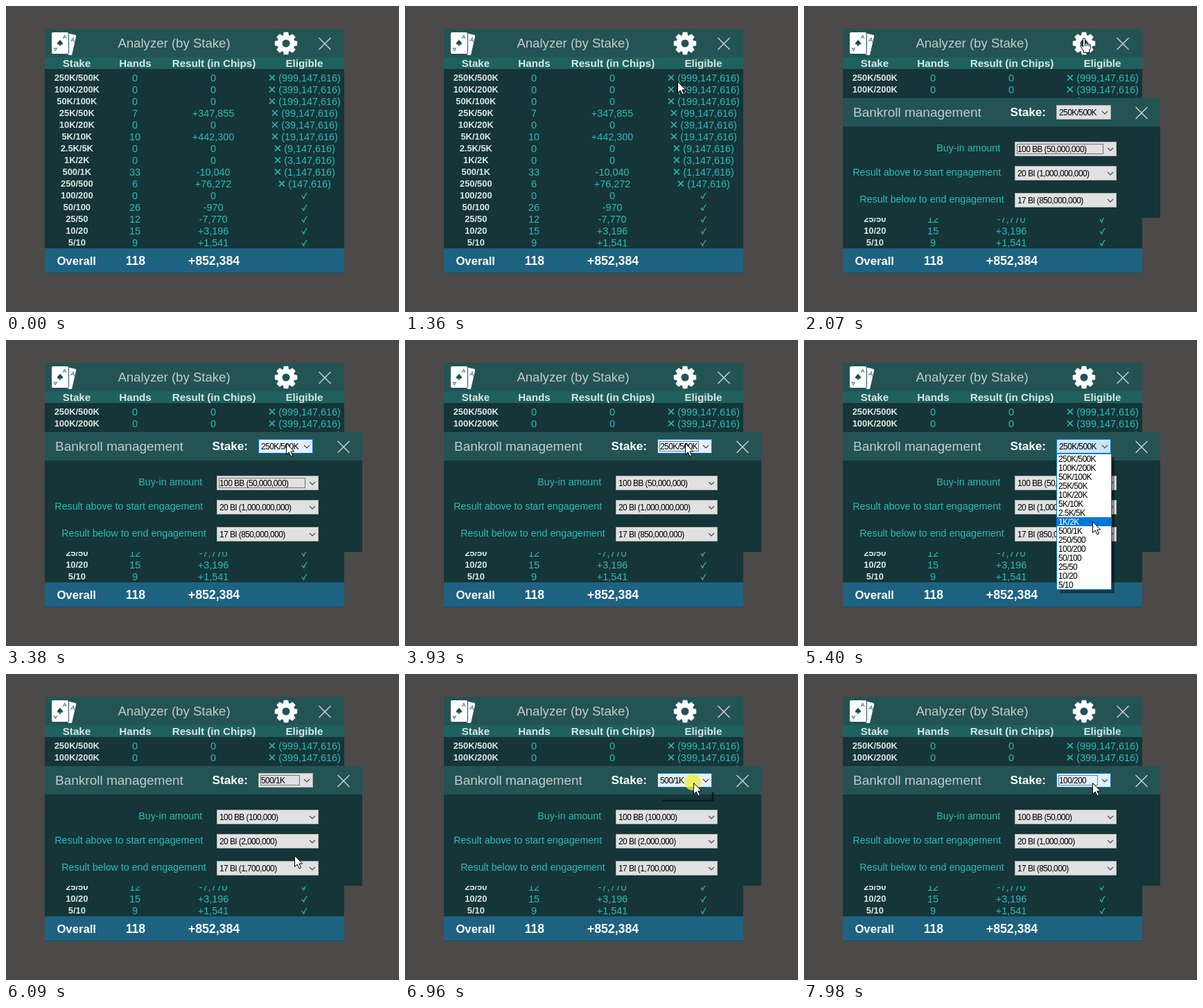
An HTML page that plays this animation: 567x442 px, repeating every 8000 ms.

```html
<!DOCTYPE html>
<html lang="en">
<head>
<meta charset="utf-8">
<title>Analyzer (by Stake)</title>
<style>
html, body { margin: 0; width: 100%; height: 100%; overflow: hidden; background: #4c4a48; }
svg { display: block; width: 567px; height: 442px; font-family: "Liberation Sans", Arial, sans-serif; }
.teal { fill: #2cbcbb; }
.pale { fill: #c3cbcb; }
.bold { font-weight: bold; fill: #fff; }
.head { font-weight: bold; fill: #dbe6e5; }
.mid { text-anchor: middle; }
.small { font-size: 12px; letter-spacing: -.6px; fill: #000; }
</style>
</head>
<body>
<svg id="stage" viewBox="0 0 567 442"></svg>
<script>
const stage = document.getElementById('stage');
const LOOP = 8000;
const STAKES = ['250K/500K', '100K/200K', '50K/100K', '25K/50K', '10K/20K', '5K/10K', '2.5K/5K',
  '1K/2K', '500/1K', '250/500', '100/200', '50/100', '25/50', '10/20', '5/10'];
const HANDS = [0, 0, 0, 7, 0, 10, 0, 0, 33, 6, 0, 26, 12, 15, 9];
const RESULTS = ['0', '0', '0', '+347,855', '0', '+442,300', '0', '0', '-10,040', '+76,272',
  '0', '-970', '-7,770', '+3,196', '+1,541'];
const MISSING = ['999', '399', '199', '99', '39', '19', '9', '3', '1'].map(n => `(${n},147,616)`)
  .concat('(147,616)');

function add(parent, tag, attrs, content) {
  const el = document.createElementNS('http://www.w3.org/2000/svg', tag);
  for (const k in attrs) el.setAttribute(k, attrs[k]);
  if (content !== undefined) el.textContent = content;
  parent.appendChild(el);
  return el;
}
const group = (parent = stage) => add(parent, 'g', {});
const rect = (p, x, y, width, height, fill, more) =>
  add(p, 'rect', { x, y, width, height, fill, ...more });
const path = (p, d, more) => add(p, 'path', { d, fill: 'none', ...more });
const text = (p, s, x, y, size, cls) =>
  add(p, 'text', { x, y, class: cls, ...(size && { 'font-size': size }) }, s);
const show = (el, on) => el.setAttribute('visibility', on ? 'visible' : 'hidden');
const cross = (p, x, y, r, stroke, width) =>
  path(p, `M${x - r} ${y - r}l${2 * r} ${2 * r}m0 ${-2 * r}l${-2 * r} ${2 * r}`,
    { stroke, 'stroke-width': width });

function drawCards(p) {
  const card = { rx: 2.5, stroke: '#245354', 'stroke-width': 1 };
  const back = add(p, 'g', { transform: 'rotate(13 84 54)' });
  rect(back, 75, 38, 24, 31, '#fff', card);
  text(back, 'A', 92, 49, 9, '').setAttribute('fill', '#245354');
  rect(p, 65.5, 37.5, 25, 32, '#fff', card);
  const ink = add(p, 'g', { fill: '#1c4d50', 'font-size': 8 });
  add(ink, 'text', { x: 82, y: 46.5 }, 'A');
  add(ink, 'text', { x: 0, y: 0, transform: 'translate(74 59.5) rotate(180)' }, 'A');
  add(ink, 'path', { d: 'M78 48.5C79 51 82 52 82 54.2C82 56 79.6 56.4 78.5 55L79.6 57.5H76.4L77.5 55C76.4 56.4 74 56 74 54.2C74 52 77 51 78 48.5Z' });
}

function drawGear(p, cx, cy) {
  const g = add(p, 'g', { transform: `translate(${cx} ${cy})`, fill: '#fff' });
  for (let a = 0; a < 360; a += 45)
    add(g, 'path', { d: 'M-4.4 -10L-3.2 -16.2H3.2L4.4 -10Z', transform: `rotate(${a})` });
  add(g, 'circle', { r: 9, fill: 'none', stroke: '#fff', 'stroke-width': 7 });
}

function drawAnalyzer() {
  const g = group();
  rect(g, 56, 33, 432, 353, '#153538');
  rect(g, 56, 33, 432, 41, '#245354');
  rect(g, 56, 74, 432, 17, '#1e615e');
  rect(g, 56, 350, 432, 35.5, '#1e6282');
  drawCards(g);
  text(g, 'Analyzer (by Stake)', 242.5, 60, 18.6, 'pale mid');
  drawGear(g, 404, 54);
  cross(g, 460, 54.5, 8.5, '#cbd3d3', 1.5);
  [['Stake', 102], ['Hands', 186.5], ['Result (in Chips)', 300], ['Eligible', 430.5]]
    .forEach(([s, x]) => text(g, s, x, 88, 15.2, 'head mid'));
  STAKES.forEach((stake, i) => {
    const y = 109 + 17 * i;
    text(g, stake, 102.3, y - 1, 12.9, 'head mid');
    text(g, HANDS[i], 186, y, 14.5, 'teal mid');
    text(g, RESULTS[i], 299, y, 14.4, 'teal mid');
    if (i < MISSING.length) {
      const label = text(g, MISSING[i], 438, y, 14.4, 'teal mid');
      cross(g, 438 - label.getComputedTextLength() / 2 - 9.3, y - 5.5, 4, '#2cbcbb', 1.7);
    } else {
      path(g, `M427 ${y - 4.5}l2.6 3.6q1.6 -5 4.6 -8.2`, { stroke: '#2cbcbb', 'stroke-width': 1.3 });
    }
  });
  text(g, 'Overall', 101.7, 374, 16.7, 'bold mid');
  text(g, '118', 186.8, 374, 17.5, 'bold mid');
  text(g, '+852,384', 300, 374, 17.7, 'bold mid');
}

function makeCombo(p, x, y, w) {
  const face = rect(p, x + .5, y + .5, w - 1, 20, '#e1e1e1', { stroke: '#adadad' });
  const label = text(p, '', x + 4, y + 15, 0, 'small');
  const focus = rect(p, x + 3.5, y + 3.5, w - 23, 14, 'none',
    { stroke: '#000', 'stroke-dasharray': '1 1' });
  path(p, `M${x + w - 13} ${y + 9}l4 4l4 -4`, { stroke: '#444', 'stroke-width': 1.1 });
  return { face, label, focus };
}

const amounts = [];
let stakeBox;
function drawDialog() {
  const g = group();
  rect(g, 56, 133, 458, 173, '#153538');
  rect(g, 56, 133, 458, 41, '#245354');
  text(g, 'Bankroll management', 71, 160, 19, 'pale');
  text(g, 'Stake:', 297.5, 159, 17.2, 'bold');
  cross(g, 487, 154.5, 8.5, '#cbd3d3', 1.5);
  [['Buy-in amount', 191.3, 196], ['Result above to start engagement', 70.3, 231],
    ['Result below to end engagement', 80.3, 270]].forEach(([s, x, y]) => {
    text(g, s, x, y + 14, 14.25, 'teal');
    amounts.push(makeCombo(g, 304, y, 147));
  });
  stakeBox = makeCombo(g, 364, 143, 79);
  return g;
}

drawAnalyzer();
const dialog = drawDialog();

// Drop-down list, unrolled by a growing clip
const shadow = rect(stage, 369, 169, 79, 197, '#000', { opacity: .4 });
const edge = path(stage, 'M372 183H444V171', { stroke: '#081b1e', 'stroke-width': 2.5 });
const clip = rect(add(add(stage, 'defs', {}), 'clipPath', { id: 'unroll' }), 364, 164, 80, 0, '#fff');
const list = add(stage, 'g', { 'clip-path': 'url(#unroll)' });
rect(list, 364.5, 164.5, 79, 196, '#fff', { stroke: '#0078d7' });
const hover = rect(list, 365, 165, 78, 13, '#0078d7');
const items = STAKES.map((s, i) => text(list, s, 367, 176 + 13 * i, 0, 'small'));

const halo = add(stage, 'circle', { r: 12, fill: '#f0ee38', opacity: .78 });
const pen = { fill: '#fff', stroke: '#000', 'stroke-width': 1, 'stroke-linejoin': 'round' };
const arrow = path(stage, 'M.5 .5V16.5L4.2 13L7 19L9.6 17.9L6.8 12H11.8Z', pen);
const hand = group();
path(hand, 'M-.5 1.5Q-.5 .5 1 .5T2.5 2V8Q4.3 6.8 5.3 8.4Q7 7.6 8 9.2Q10 8.8 10.2 11V15.5L8.5 18V21.5H.5V19L-4 12.5Q-4.6 10.8 -3 10.7L-.5 13Z', pen);
path(hand, 'M2.5 8V12M5.3 8.6V12M8 9.4V12.3', { stroke: '#000' });

// Cursor moves: start, last step, number of steps, from x y, to x y
const MOVES = [
  [660, 810, 3, 452, 437, 379, 193],
  [1120, 1580, 7, 379, 193, 403, 46],
  [3000, 3380, 6, 403, 46, 404, 149],
  [4940, 5400, 7, 404, 149, 416, 262],
  [5480, 5480, 1, 416, 262, 416, 277],
  [6020, 6570, 8, 416, 277, 416, 157]
];
const CLICKS = [[1900, 2070], [3460, 3770], [4470, 4710], [5630, 5860], [6740, 6800], [6960, 7200]];
// Time and visible height of the list
const UNROLL = [[0, 0], [3540, 90], [3610, 197], [3690, 0], [4550, 110], [4630, 197], [5860, 0],
  [7040, 189], [7120, 0]];
const STAKE_AT = [[0, 0], [5860, 8], [7280, 9], [7980, 10]];
const BLIND_AT = [[0, 500000], [5940, 1000], [7520, 500]];
const FOCUS = [[3840, 4470], [5860, 6650], [7280, LOOP]];

const held = (table, t) => table.filter(row => row[0] <= t).pop()[1];
const within = (spans, t) => spans.some(([a, b]) => t >= a && t < b);

function cursorAt(t) {
  const move = MOVES.filter(m => m[0] <= t).pop();
  if (!move) return null;
  const [start, end, n, x0, y0, x1, y1] = move;
  const gap = n > 1 ? (end - start) / (n - 1) : 1;
  const p = Math.min(n, Math.floor((t - start) / gap + .05) + 1) / n;
  return [x0 + (x1 - x0) * p, y0 + (y1 - y0) * p];
}

function render(t) {
  const pos = cursorAt(t);
  const [x, y] = pos || [0, 0];
  const onGear = pos && y < 70;
  show(arrow, pos && !onGear);
  show(hand, onGear);
  for (const el of [arrow, hand]) el.setAttribute('transform', `translate(${Math.round(x)} ${Math.round(y)})`);
  show(halo, within(CLICKS, t));
  halo.setAttribute('cx', Math.round(x) - (onGear ? 2 : 1));
  halo.setAttribute('cy', Math.round(y) - (onGear ? 0 : 1));

  show(dialog, t >= 2070);
  const shown = t >= 2070;
  const height = held(UNROLL, t);
  const open = height === 197 && t > 4000;
  const over = x >= 364 && x < 443 && y >= 143 && y < 164;
  stakeBox.face.setAttribute('fill', open ? '#cce4f7' : over ? '#e5f1fb' : '#e1e1e1');
  stakeBox.face.setAttribute('stroke', open || over ? '#0078d7' : '#adadad');
  const stake = held(STAKE_AT, t);
  stakeBox.label.textContent = STAKES[stake];
  show(stakeBox.focus, shown && within(FOCUS, t));

  const blind = held(BLIND_AT, t);
  [[100, 'BB', 100], [20, 'BI', 2000], [17, 'BI', 1700]].forEach(([n, unit, k], i) => {
    amounts[i].label.textContent = `${n} ${unit} (${(blind * k).toLocaleString('en-US')})`;
    show(amounts[i].focus, shown && i === 0 && t < 3460);
  });

  show(shadow, open);
  show(edge, t >= 6960 && t < 7040);
  show(list, height > 0);
  clip.setAttribute('height', height);
  const row = y > 165 ? Math.min(14, Math.floor((y - 165) / 13)) : stake;
  hover.setAttribute('y', 165 + 13 * row);
  items.forEach((item, i) => { item.style.fill = i === row ? '#fff' : '#000'; });
}

const begin = performance.now();
function tick() {
  render((performance.now() - begin) % LOOP);
  requestAnimationFrame(tick);
}
tick();
</script>
</body>
</html>
```
